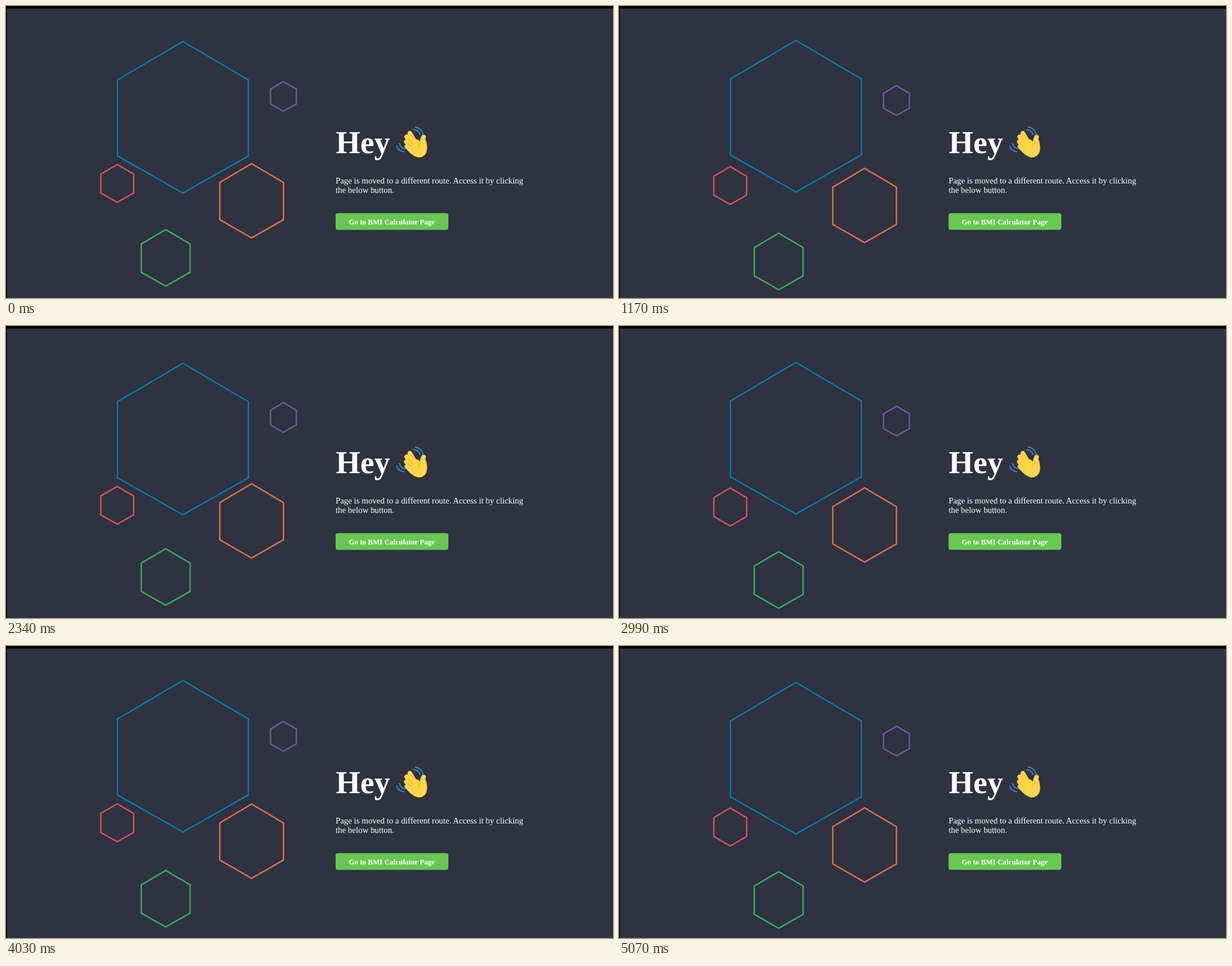
An HTML page that plays this animation: 1040 by 500 pixels, repeating every 5.2 s.

```html
<!DOCTYPE html>
<html lang="en">
<head>
<meta charset="utf-8">
<title>Page moved</title>
<style>
  html, body { margin: 0; width: 100%; height: 100%; overflow: hidden; background: #000; }
  svg { display: block; width: 1040px; height: 500px; }
  text { font-family: "Liberation Serif", "Times New Roman", serif; fill: #fff; }
  .bold { font-weight: bold; }
  .hand { fill: none; stroke: #ffd645; stroke-linecap: round; }
  .crease { fill: none; stroke: #e7a535; stroke-width: 1; stroke-linecap: round; }
  .wave { fill: none; stroke: #3f86cb; stroke-width: 2; stroke-linecap: round; }
</style>
</head>
<body>
<svg viewBox="0 0 1040 500">
  <rect x="1.4" y="4.5" width="1039" height="496" fill="#2e3241"/>
  <g id="hexagons" transform="translate(158.4 52.9) scale(.41)" fill="none" stroke-width="6"></g>

  <text class="bold" x="565" y="252" font-size="54">Hey</text>
  <g>
    <path class="wave" d="M701 207 Q712 209 714.500 219 M698 211.500 Q706.500 212.500 709.500 220"/>
    <path class="wave" d="M669.500 240 Q672.500 249 682 249.500 M674 235.500 Q676.500 243 683 244.500"/>
    <path class="hand" stroke-width="8" d="M705 240 L692 218 M700 243 L686.500 224 M699 247 L686 232.500 M698 250 L687 240.500 M714 246 Q711 232 715.500 224.500"/>
    <path d="M695 231 L704 228 Q709 231 711 235 L718 226 Q722 235 721.500 244 Q720.500 258 708 259.500 Q698 259 686 245 Z" fill="#ffd645"/>
    <path class="crease" d="M703 231 L694.500 220.500 M698.500 236.500 L688.500 226.500 M695 241.500 L686.500 234.500 M711 234 Q706.500 239 707.500 244"/>
  </g>

  <g font-size="14.4">
    <text x="564.7" y="303.7">Page is moved to a different route. Access it by clicking</text>
    <text x="564.7" y="320.4">the below button.</text>
  </g>

  <rect x="564.7" y="354.8" width="193.200" height="28.400" rx="3.600" fill="#66c84f"/>
  <text class="bold" x="587.2" y="373.700" font-size="12.6">Go to BMI Calculator Page</text>
</svg>
<script>
const LOOP = 5200, STEP = 130, PERIOD = 2080, DELAY = PERIOD / 10, LIFT = 20;

// centre x, half width, then y of top, upper corners, lower corners, bottom
const shapes = [
  ['#0779ab', 353, 273.7, 9, 170, 487, 642],
  ['#d95055', 78.5, 68.5, 529, 569.2, 648.3, 687],
  ['#6e5992', 773, 54, 186, 217.5, 279.6, 310],
  ['#e06f40', 640, 133, 529, 607.8, 763.1, 839],
  ['#36ae53', 281, 102, 801, 861, 979.2, 1037]
];

const group = document.getElementById('hexagons');
const hexagons = shapes.map(([color, x, w, top, upper, lower, bottom]) => {
  const el = document.createElementNS(group.namespaceURI, 'polygon');
  el.setAttribute('points', [x, top, x + w, upper, x + w, lower,
    x, bottom, x - w, lower, x - w, upper].join(' '));
  el.setAttribute('stroke', color);
  group.append(el);
  return el;
});

// cubic-bezier(.42, 0, .58, 1)
function easeInOut(x) {
  let lo = 0, hi = 1, u = x;
  for (let i = 0; i < 24; i++) {
    u = (lo + hi) / 2;
    const bx = 3 * u * (1 - u) * (1 - u) * 0.42 + 3 * u * u * (1 - u) * 0.58 + u * u * u;
    if (bx < x) lo = u; else hi = u;
  }
  return u * u * (3 - 2 * u);
}

function render(time) {
  const t = Math.floor((time % LOOP) / STEP) * STEP;
  hexagons.forEach((el, i) => {
    const phase = ((t + PERIOD / 4 - i * DELAY + PERIOD) % PERIOD) / PERIOD;
    const rise = 1 - Math.abs(1 - 2 * phase);
    el.setAttribute('transform', `translate(0 ${(LIFT * easeInOut(rise)).toFixed(3)})`);
  });
}

const start = performance.now();
function tick() {
  render(performance.now() - start);
  requestAnimationFrame(tick);
}
tick();
</script>
</body>
</html>
```
